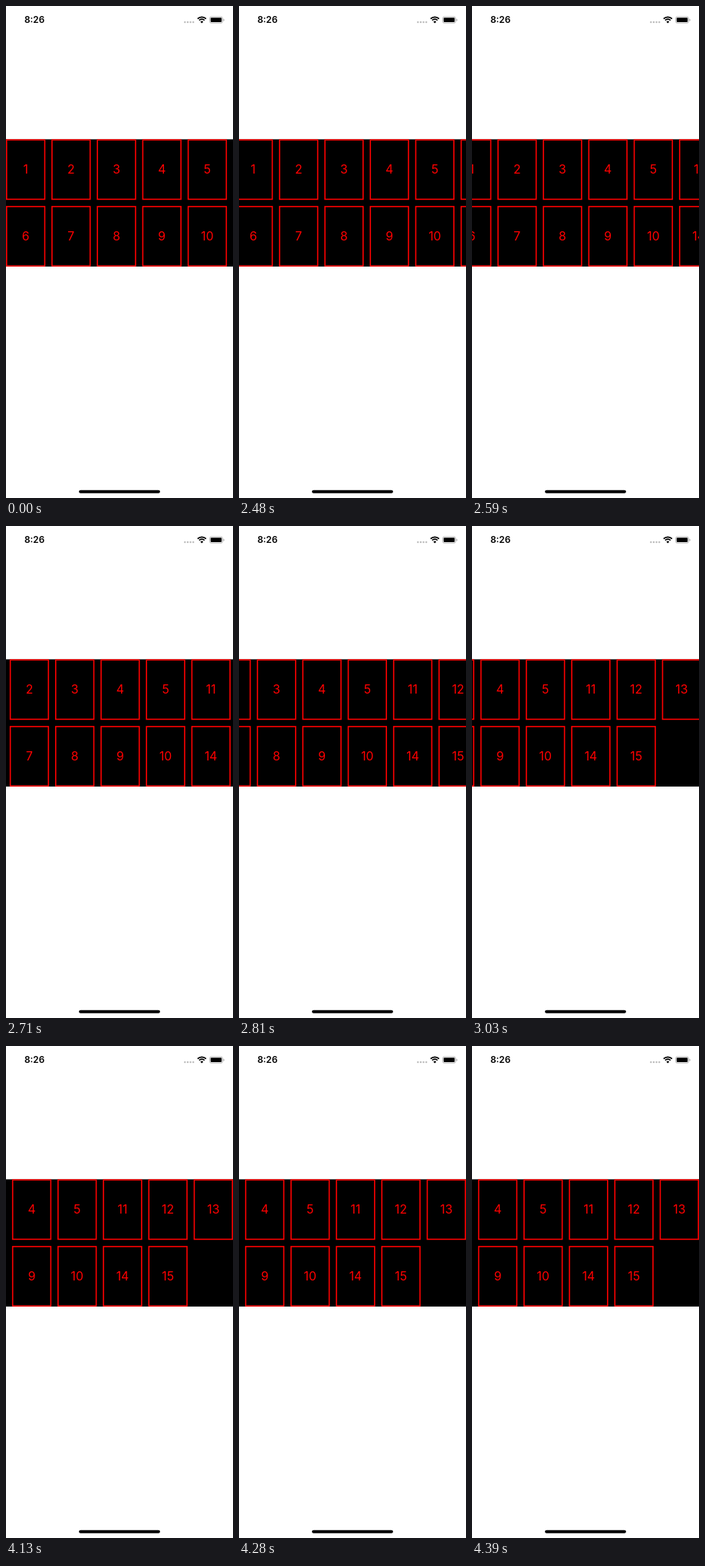
Animation of 296 by 640 pixels, one loop 4420 ms. Source, as an HTML page:

```html
<!DOCTYPE html>
<html lang="en">
<head>
<meta charset="utf-8">
<title>Horizontal grid</title>
<style>
  html, body { margin: 0; height: 100%; overflow: hidden; background: #fff; }
  svg { display: block; width: 100vw; height: 100vh; }
  text { font-family: Inter, Roboto, sans-serif; text-anchor: middle; }
  #grid text { font-size: 20px; fill: #f00; }
  #grid rect { fill: none; stroke: #f00; stroke-width: 2; }
</style>
</head>
<body>
<svg viewBox="0 0 375 812" preserveAspectRatio="none">
  <text x="47" y="28.2" font-size="15" font-weight="600">8:26</text>
  <g fill="#bdbdbd">
    <circle cx="295.6" cy="26.7" r="1.5"/>
    <circle cx="300.2" cy="26.7" r="1.5"/>
    <circle cx="304.8" cy="26.7" r="1.5"/>
    <circle cx="309.4" cy="26.7" r="1.5"/>
  </g>
  <g fill="none" stroke="#000" stroke-width="2.2">
    <path d="M316.5 21a9.9 9.9 0 0 1 14 0"/>
    <path d="M319.1 23.6a6.2 6.2 0 0 1 8.8 0"/>
  </g>
  <path d="M323.5 28.4l-2.4-2.4a3.4 3.4 0 0 1 4.8 0z"/>
  <rect x="336.5" y="17.8" width="21.3" height="10.4" rx="2.6" fill="none" stroke="#000" stroke-opacity=".35"/>
  <rect x="338" y="19.3" width="18.3" height="7.4" rx="1.4"/>
  <path d="M359.2 21v4a2.2 2.2 0 0 0 0-4z" fill-opacity=".4"/>

  <rect y="220" width="375" height="210"/>
  <g id="grid"></g>
  <rect x="120.5" y="799" width="134" height="5" rx="2.5"/>
</svg>
<script>
const LOOP = 4420;
const columns = [[1, 6], [2, 7], [3, 8], [4, 9], [5, 10], [11, 14], [12, 15], [13]];
// [start ms, scroll offset in points]; each offset holds until the next
const scroll = [
  [0, 0], [2480, 9], [2590, 33], [2710, 68.9], [2810, 120.5],
  [2930, 176], [3030, 211.2], [4130, 215]
];

const grid = document.getElementById('grid');
grid.innerHTML = columns.map((column, c) => column.map((label, r) => `
  <g transform="translate(${c * 75} ${220 + r * 110})">
    <rect x="1" y="1" width="63" height="98"/>
    <text x="32.5" y="57.2">${label}</text>
  </g>`).join('')).join('');

function draw(now) {
  const t = now % LOOP;
  const [, offset] = scroll.findLast(([start]) => start <= t);
  grid.setAttribute('transform', `translate(${-offset} 0)`);
  requestAnimationFrame(draw);
}
draw(0);
</script>
</body>
</html>
```
